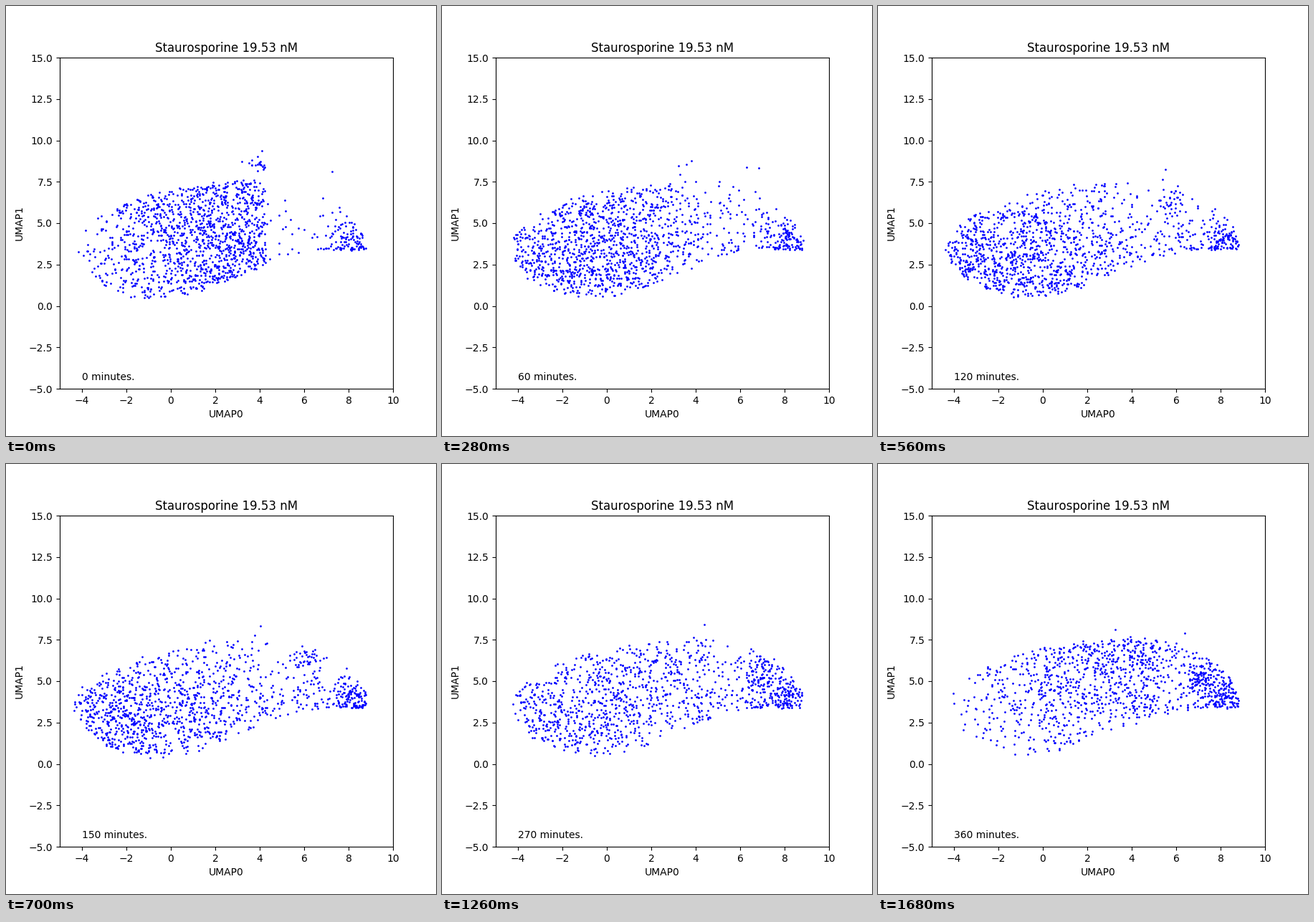
These frames come from a looping animation (600x600 px, 1820 ms). A matplotlib script:

```python
import numpy as np
import matplotlib.pyplot as plt
from matplotlib.animation import FuncAnimation

FRAMES, INTERVAL, STEP_MINUTES = 13, 140, 30
LEFT, RIGHT, CREST = -4.4, 8.9, 4.4

plt.rcParams["text.kerning_factor"] = 6


def smoothstep(v):
    v = np.clip(v, 0, 1)
    return v * v * (3 - 2 * v)


def outline(x):
    """Lower and upper edge of the region the points can occupy."""
    curl = np.clip((-1 - x) / 3.4, 0, 1)
    low = .5 + 2.9 * (1 - (1 - curl ** 2) ** .7 + smoothstep((x + .5) / 7.5))
    reach = np.where(x < CREST, CREST - LEFT, RIGHT - CREST)
    arch = np.clip(1 - ((x - CREST) / reach) ** 2, 0, 1)
    return low, 3.5 + 4.1 * arch ** .55


def fill(rng, x, a, b):
    """Spread points between the edges, heights following a beta law."""
    low, high = outline(x)
    y = low + (high - low) * rng.beta(a, b, x.size)
    return np.column_stack([x, y + rng.normal(0, .07, x.size)])


def blob(rng, center, spread, size):
    """Gaussian blob cut off at the outline."""
    xy = rng.normal(center, spread, (int(size), 2))
    low, high = outline(xy[:, 0])
    return xy[(xy[:, 1] > low) & (xy[:, 1] < high)]


def sample_cloud(step):
    rng = np.random.default_rng(100 + step)
    s = step / (FRAMES - 1)

    # The main body swings left quickly, then slowly back to the right.
    mean = .43 + .2 * np.exp(-step / 1.5) + .18 * max(0, (s - .4) / .6) ** 2
    u = rng.beta(3.7 * mean, 3.7 * (1 - mean), int(750 + 520 * (1 - s) ** 1.5))
    body = fill(rng, LEFT + (8.7 + s) * u,
                1 + .4 * s, 1 + .5 * np.sin(np.pi * s))

    # The tail fills up while a clump grows and drifts down along it.
    tail = fill(rng, rng.uniform(3.9, 8.8, int(60 + 170 * s ** .6)),
                1, 2.2 - s)
    center = np.array([5.3, 6.9]) + smoothstep(s) * np.array([1.9, -1.7])
    clump = blob(rng, center, (.45, .55), 100 * s)
    corner = blob(rng, (8.1, 4.1), (.4, .6), 75)
    rim_x = rng.uniform(6.5, 8.8, 20)
    rim = np.column_stack([rim_x, outline(rim_x)[0]
                           + np.abs(rng.normal(0, .12, rim_x.size))])

    # A small islet on top dissolves, leaving a few strays.
    islet = rng.normal((3.8, 8.55), (.3, .22), (int(20 * np.exp(-.8 * step)), 2))
    strays = rng.uniform((3.2, 7.6), (7.4, 8.5), (2, 2))
    return np.vstack([body, tail, clump, corner, rim, islet, strays])


fig, ax = plt.subplots(figsize=(6, 6), dpi=100)
ax.set(xlim=(-5, 10), ylim=(-5, 15), xlabel="UMAP0", ylabel="UMAP1",
       title="Staurosporine 19.53 nM")
dots, = ax.plot([], [], "o", color="blue", markersize=1)
label = ax.text(-4, -4.5, "")


def update(step):
    dots.set_data(*sample_cloud(step).T)
    label.set_text(f"{step * STEP_MINUTES} minutes.")
    return dots, label


anim = FuncAnimation(fig, update, frames=FRAMES, interval=INTERVAL,
                     repeat=True, repeat_delay=0)
plt.show()
```
